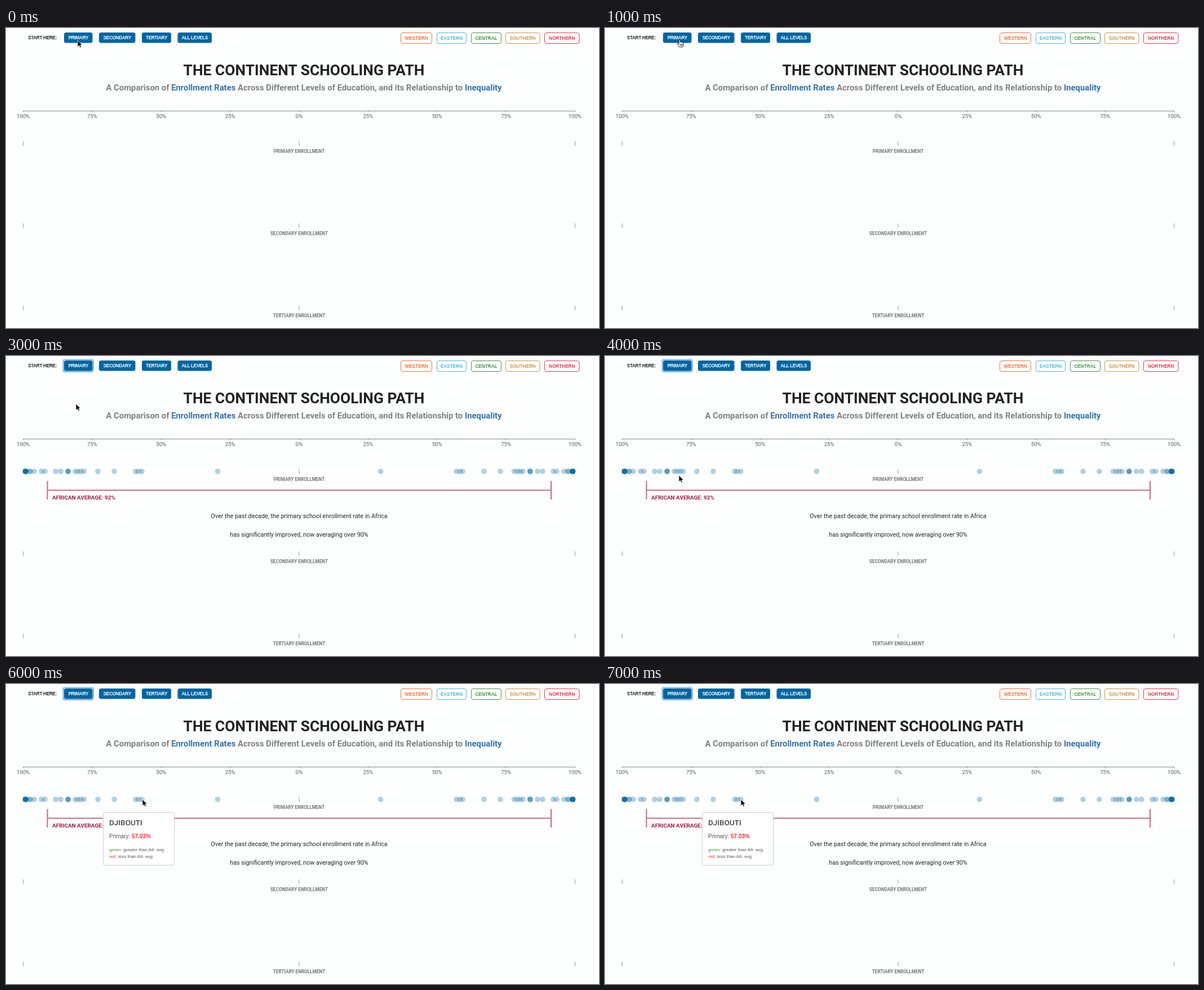
An HTML page for the animation above (8 s loop, 1052 px wide and 533 px high).

```html
<!DOCTYPE html>
<html lang="en">
<head>
<meta charset="utf-8">
<title>Enrollment chart</title>
<style>
html, body { margin: 0; width: 100%; height: 100%; overflow: hidden; background: #fdfefe; }
svg { display: block; width: 1052px; height: 533px; font-family: Roboto, sans-serif; }
.ui { font-family: "Liberation Sans", Arial, sans-serif; font-weight: 700; }
.tight { font-size: 8.2px; letter-spacing: -.32px; }
.mid { text-anchor: middle; }
.title { font-size: 26.4px; font-weight: 700; fill: #222; }
.sub { font-size: 14.85px; font-weight: 700; fill: #808080; }
.sub tspan { fill: #3273b0; }
.tick { font-size: 9.7px; fill: #5a5a5a; }
.row { font-size: 8.2px; font-weight: 700; fill: #777; }
.note { font-size: 10.8px; fill: #222; }
.tip { font: 8px "Liberation Sans", Arial, sans-serif; fill: #555; }
.tip .name { font: 500 13.5px Roboto, sans-serif; fill: #444; }
.tip .rate { font-size: 10px; }
.tip .low { fill: #f5333a; }
.tip .high { fill: #3c9a35; }

/* Every change is a hard cut on a whole second. */
.step { animation: 8s step-end infinite; }
.hit { animation-name: hit; }
.avg { animation-name: avg; }
.tip1 { animation-name: tip1; }
.tip2 { animation-name: tip2; }
.arrow { animation-name: arrow; }
.hand { animation-name: hand; }
@keyframes hit { 0% { opacity: 0 } 25%, 100% { opacity: 1 } }
@keyframes avg { 0% { opacity: 0 } 37.5%, 100% { opacity: 1 } }
@keyframes tip1 { 0% { opacity: 0 } 62.5% { opacity: .86 } 75%, 100% { opacity: 0 } }
@keyframes tip2 { 0% { opacity: 0 } 75%, 100% { opacity: 1 } }
@keyframes hand { 0% { opacity: 0 } 12.5% { opacity: 1 } 37.5%, 100% { opacity: 0 } }
@keyframes arrow {
  0% { transform: translate(127px, 22px); opacity: 1 }
  12.5% { transform: translate(127px, 22px); opacity: 0 }
  37.5% { transform: translate(124px, 85px); opacity: 1 }
  50% { transform: translate(131px, 212px); opacity: 1 }
  62.5% { transform: translate(205px, 206px); opacity: 1 }
  75% { transform: translate(242px, 205px); opacity: 1 }
  87.5%, 100% { transform: translate(241px, 205px); opacity: 1 }
}
</style>
</head>
<body>
<svg viewBox="0 0 1052 533">
  <text class="ui tight" x="39" y="19.9" fill="#222">START HERE:</text>
  <rect class="step hit" x="101.5" y="6.5" width="53.5" height="21.5" rx="3" fill="#d5e5f7" stroke="#8ab4ea" stroke-width="2"/>
  <g id="buttons"></g>

  <text class="title mid" x="528.5" y="84">THE CONTINENT SCHOOLING PATH</text>
  <text class="sub mid" x="528.5" y="111">A Comparison of <tspan>Enrollment Rates</tspan> Across Different Levels of Education, and its Relationship to <tspan>Inequality</tspan></text>

  <path d="M30.5 147.5H1010" stroke="#888" fill="none"/>
  <g id="axis"></g>
  <g id="rows"></g>
  <g id="dots" class="step hit" fill="#0066a1" fill-opacity=".3"></g>

  <g class="step avg">
    <path d="M73.5 222V255M967 222V255M73.5 238.5H967" fill="none" stroke="#c9688a" stroke-width="2"/>
    <text x="82" y="255" font-size="9.95" font-weight="700" fill="#a51c48">AFRICAN AVERAGE: 92%</text>
    <text class="note mid" x="520" y="288">Over the past decade, the primary school enrollment rate in Africa</text>
    <text class="note mid" x="520" y="321">has significantly improved, now averaging over 90%</text>
  </g>
  <g id="tips"></g>

  <path class="step arrow" d="M0 0V11.5L2.7 9.1L4.5 13L6.5 12.1L4.8 8.3H8.4Z" fill="#000" stroke="#fff" stroke-width=".8"/>
  <path class="step hand" d="M131.2 21.2C131.2 19.7 133.3 19.7 133.3 21.2V25.2C134 24.4 135.2 24.7 135.4 25.5C136.2 24.9 137.3 25.3 137.4 26.2C138.4 25.7 139.3 26.3 139.3 27.3V30L138 33.8H132L128.3 28.6C127.8 27.3 129.2 26.7 130 27.6L131.2 29ZM133.8 28.5V31.5M135.4 28.5V31.5M137 28.5V31.5" fill="#fff" stroke="#111" stroke-width=".9" stroke-linejoin="round"/>
</svg>
<script>
const CENTER = 520, HALF = 489.5;
const fill = (id, html) => { document.getElementById(id).innerHTML = html; };

const solid = [["PRIMARY", 103, 50.5], ["SECONDARY", 165, 64.5], ["TERTIARY", 241, 52], ["ALL LEVELS", 304.5, 60.5]];
const outlined = [
  ["WESTERN", 700.5, 55, "#f4703c"], ["EASTERN", 764.5, 52, "#48bbdc"], ["CENTRAL", 825.5, 53, "#43964a"],
  ["SOUTHERN", 886.5, 60.5, "#c7964c"], ["NORTHERN", 955.5, 61.5, "#e93548"]
];
const button = (label, x, w, y, h, type, box, ink) =>
  `<rect x="${x}" y="${y}" width="${w}" height="${h}" rx="3.5" ${box}/>
   <text class="ui mid ${type}" x="${x + w / 2}" y="${y + h / 2 + 2.7}" font-size="8.2" fill="${ink}">${label}</text>`;
fill("buttons",
  solid.map(([label, x, w]) => button(label, x, w, 8, 18.5, "tight", 'fill="#0066a1"', "#fff")).join("") +
  outlined.map(([label, x, w, c]) => button(label, x, w, 8.5, 19, "", `fill="#fff" stroke="${c}"`, c)).join(""));

let axis = "";
for (let p = -100; p <= 100; p += 25) {
  const x = CENTER + p / 100 * HALF;
  axis += `<path d="M${x} 147V149.5" stroke="#888"/><text class="tick mid" x="${x}" y="159.5">${Math.abs(p)}%</text>`;
}
fill("axis", axis);

fill("rows", ["PRIMARY", "SECONDARY", "TERTIARY"].map((level, i) => {
  const y = 205 + i * 146.2;
  const marks = [30.5, 520, 1009.5].map(x => `<path d="M${x} ${y - 4}v8" stroke="#999"/>`).join("");
  return `${marks}<text class="row mid" x="520" y="${y + 16.5}">${level} ENROLLMENT</text>`;
}).join(""));

// Repeated positions are countries whose dots overlap.
const dots = [34, 34.5, 35, 35, 35, 35, 35, 35.5, 42.5, 43, 50, 63, 69, 88, 97, 110, 110, 110.5,
  123, 128, 133, 138.5, 163, 192, 230, 235, 241, 375.5];
fill("dots", dots.map(x => [x, 2 * CENTER - x]
  .map(cx => `<circle cx="${cx}" cy="205" r="4.8"/>`).join("")).join(""));

const tip = (cls, x, y, name, rate) => `<g class="step tip ${cls}"><g transform="translate(${x} ${y})">
  <rect width="126" height="93.5" rx="2.5" fill="#fff" stroke="#ccc"/>
  <text class="name" x="10.5" y="22.5">${name}</text>
  <text class="rate" x="10.5" y="45.5">Primary: <tspan class="low" font-weight="700">${rate}%</tspan></text>
  <text x="10.5" y="68.5"><tspan class="high">green:</tspan> greater than Afr. avg.</text>
  <text x="10.5" y="80.5"><tspan class="low">red:</tspan> less than Afr. avg.</text></g></g>`;
fill("tips", tip("tip1", 122.5, 231, "SUDAN", "67.38") + tip("tip2", 172.5, 228.5, "DJIBOUTI", "57.03"));
</script>
</body>
</html>
```
